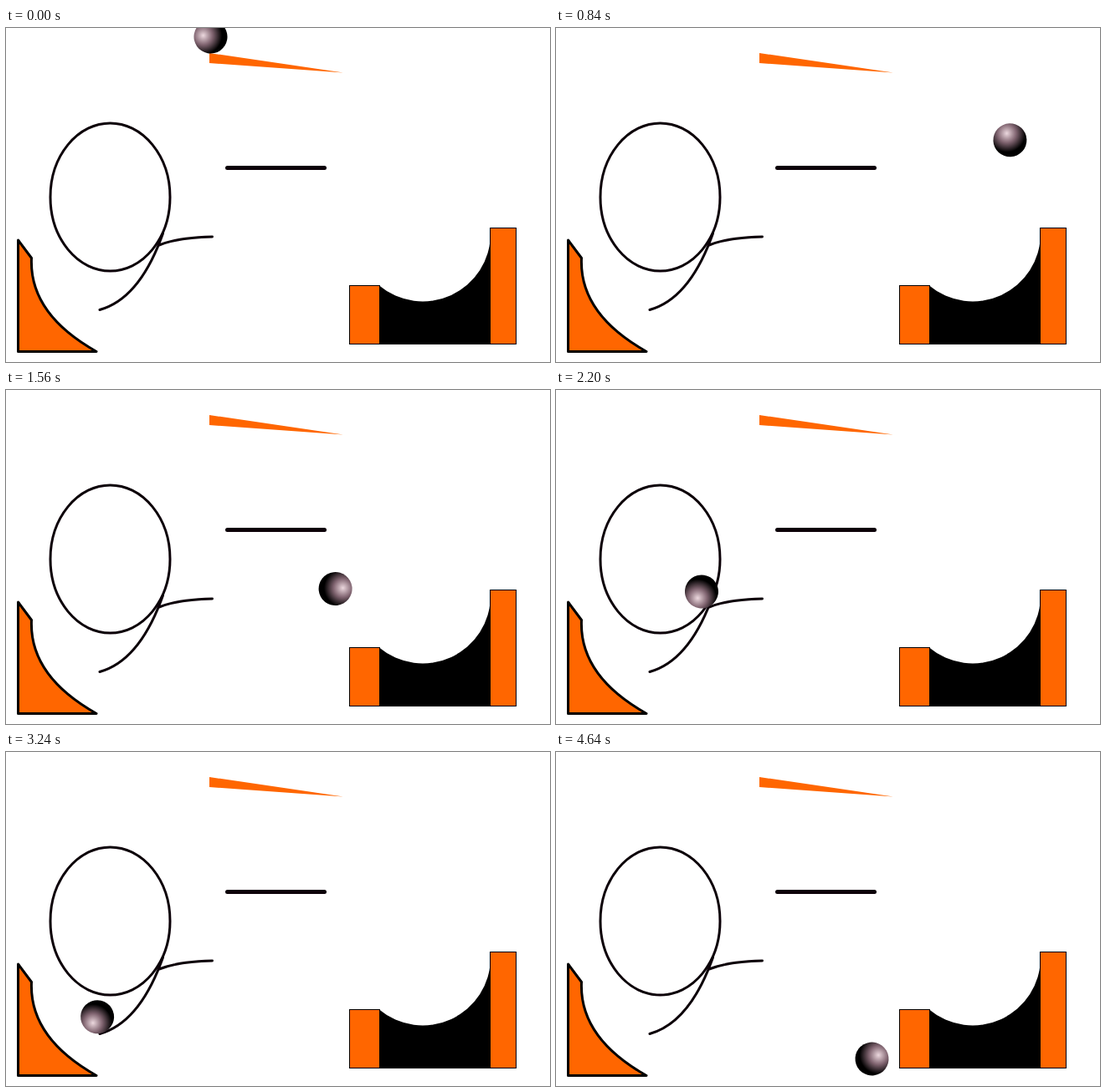
An HTML page that plays this animation: 650 by 400 pixels, repeating every 4800 ms.

```html
<!DOCTYPE html>
<html lang="en">
<head>
<meta charset="utf-8">
<title>Rolling ball</title>
<style>
  html, body { margin: 0; height: 100%; overflow: hidden; background: #fff; }
  svg { display: block; }
  .line { fill: none; stroke: #0c0008; stroke-width: 3; stroke-linecap: round; }
  .block { fill: #f60; stroke: #000; }
</style>
</head>
<body>
<svg width="650" height="400" viewBox="0 0 650 400">
  <defs>
    <radialGradient id="shine" gradientUnits="userSpaceOnUse" cx="9" cy="0" r="25">
      <stop offset="0" stop-color="#ecd8de"/>
      <stop offset=".45" stop-color="#806470"/>
      <stop offset=".9" stop-color="#000"/>
    </radialGradient>
  </defs>
  <path fill="#f60" d="M243 30L403 53.5L243 42Z"/>
  <path class="line" style="stroke-width:5" d="M264.500 167.500H380.500"/>
  <ellipse class="line" cx="124.500" cy="202.500" rx="71.500" ry="88.500"/>
  <path class="line" d="M246.500 250Q205 251 183 260M187.500 246Q160 324 112 337.500"/>
  <path class="block" stroke-width="3" stroke-linejoin="round" d="M14.500 254L30.500 275.500C28 330 68 365 108 387.500H14.500Z"/>
  <path d="M446 308.500A81 81 0 0 0 579 247V379H446Z"/>
  <rect class="block" x="410.500" y="308.500" width="36" height="70"/>
  <rect class="block" x="578.500" y="239.500" width="31" height="139"/>
  <circle id="ball" r="20" fill="url(#shine)"/>
</svg>
<script>
const LOOP = 4800, STEP = 40;
const ball = document.getElementById('ball');

// start ms, end ms, ease (1 = speed up, -1 = slow down), angles, route
const legs = [
  [0, 560, 1, 190, 200, 'M244.5 10.5L409 34'],
  [560, 1120, 0, 200, 290, 'M409 34C470 42 518 80 541.5 132C561 180 575 255 533 300'],
  [1120, 1720, .32, 290, 385, 'M533 300C510 314 478 309 460 293L394.5 239L348 190L336 182'],
  [1760, 2240, 0, 385, 490, 'M336 182C290 195 260 222 228 231L174.5 241L162 251.8'],
  [2240, 2760, 0, 490, 690, 'M162 251.8A53 69 0 1 1 104.6 139'],
  [2800, 3040, .4, 690, 840, 'M104.6 139A53 69 0 0 1 162 251.8'],
  [3080, 3360, 0, 840, 850, 'M162 251.8C154 275 136 305 113.5 315C92 325 80 342 53 311'],
  [3440, 4000, .2, 850, 910, 'M53 311C60 335 85 356 117 366C150 372 200 358 250.5 358'],
  [4000, 4640, -1, 910, 1050, 'M250.5 358C300 358 340 368 377.5 367.5']
].map(([start, end, ease, from, to, d]) => {
  const route = document.createElementNS('http://www.w3.org/2000/svg', 'path');
  route.setAttribute('d', d);
  return { start, end, ease, from, to, route, length: route.getTotalLength() };
});

function draw(now) {
  const t = Math.floor(now % LOOP / STEP) * STEP;
  const leg = legs.filter(l => l.start <= t).pop();
  const u = Math.min(1, (t - leg.start) / (leg.end - leg.start));
  const f = u + leg.ease * (u * u - u);
  const { x, y } = leg.route.getPointAtLength(f * leg.length);
  const angle = leg.from + (leg.to - leg.from) * f;
  ball.setAttribute('transform', `translate(${x} ${y}) rotate(${angle})`);
}

let begin;
function tick(now) {
  begin ??= now;
  draw(now - begin);
  requestAnimationFrame(tick);
}
draw(0);
requestAnimationFrame(tick);
</script>
</body>
</html>
```
